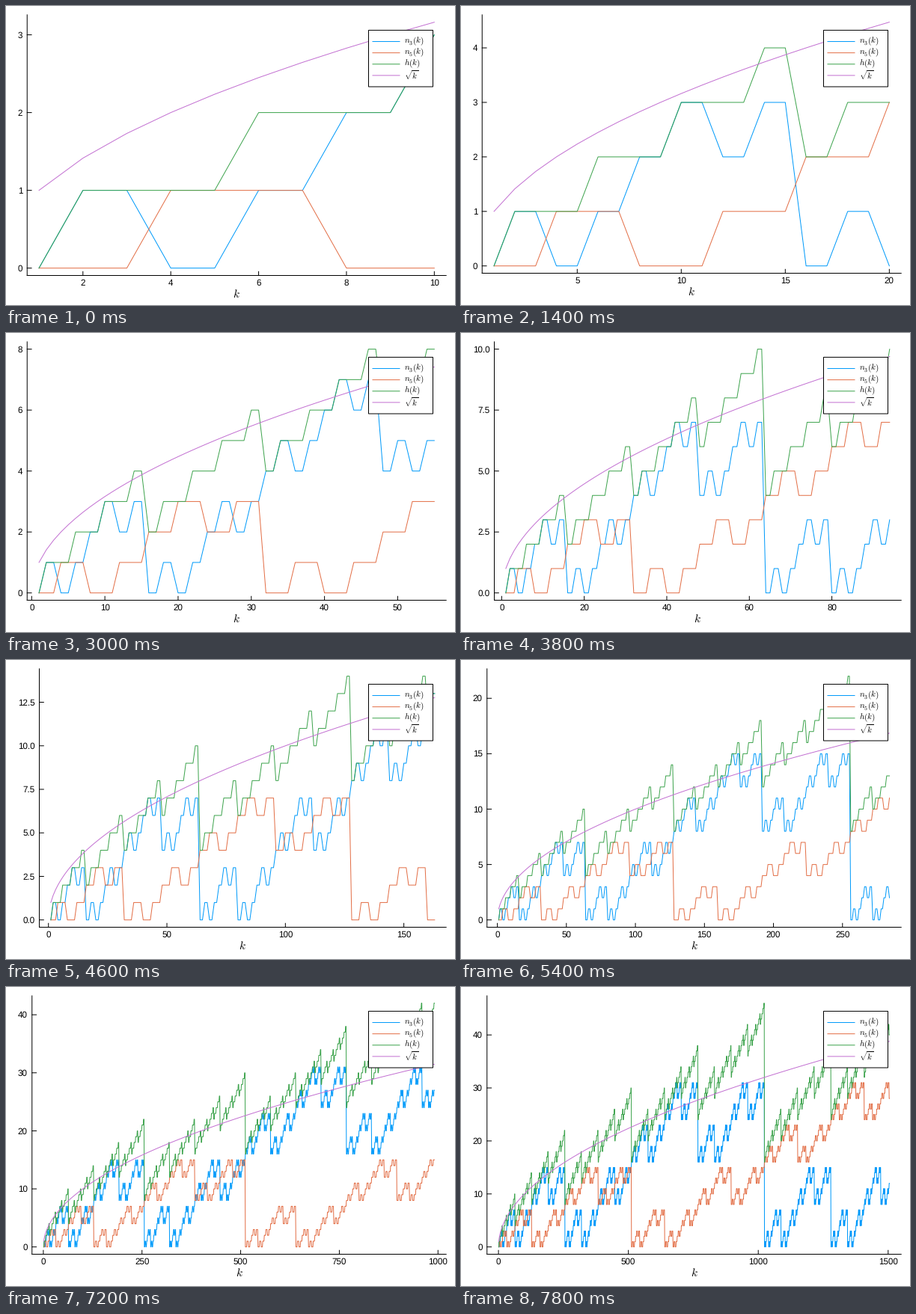
These frames come from a looping animation (600 by 400 pixels, 8000 ms). A matplotlib script:

```python
import math

import matplotlib.pyplot as plt
import numpy as np
from matplotlib.animation import FuncAnimation
from matplotlib.patches import Rectangle

W, H, DPI = 600, 400, 100
FRAMES, INTERVAL = 40, 200
PX = 72 / DPI  # one pixel in points
MARGIN = 11.81  # 3 mm
TOP, RIGHT = MARGIN, W - MARGIN
LEGEND_TOP, ROW = 32.4, 15.12
COLORS = ["#009afa", "#e36f47", "#3ea44e", "#c371d2"]
LABELS = ["$n_3(k)$", "$n_5(k)$", "$h(k)$", r"$\sqrt{k}$"]
NICE = [(1, 1.0), (5, 0.9), (2, 0.7), (2.5, 0.5), (3, 0.2)]
TICK_SIZE = 8.4

plt.rcParams["font.family"] = "Liberation Sans"
plt.rcParams["mathtext.fontset"] = "cm"
plt.rcParams["path.simplify"] = False
plt.rcParams["path.snap"] = False
plt.rcParams["text.hinting"] = "none"

fig = plt.figure(figsize=(W / DPI, H / DPI), dpi=DPI, facecolor="white")
ax = fig.add_axes([0, 0, 1, 1])

# Each frame shows about 15 % more terms than the one before.
sizes = [10]
while len(sizes) < FRAMES:
    sizes.append(sizes[-1] * 115 // 100)


def every_other_bit(k, first):
    """Read bits first, first + 2, ... of k as a binary number."""
    return sum(((k >> (first + 2 * i)) & 1) << i for i in range(6))


k_all = np.arange(1, sizes[-1] + 1)
n3 = every_other_bit(k_all, 1)
n5 = every_other_bit(k_all, 2)
series = [n3, n5, n3 + n5, np.sqrt(k_all)]


def widen(lo, hi):
    pad = 0.03 * (hi - lo)
    return lo - pad, hi + pad


def nice_ticks(lo, hi):
    """Choose tick values by count, coverage and roundness of the step."""
    options = []
    for z in range(4, -3, -1):
        for q, niceness in NICE:
            step = q * 10.0 ** z
            first, last = math.ceil(lo / step), math.floor(hi / step)
            n = last - first + 1
            if 4 <= n <= 8:
                score = (0.25 * (1 - abs(n - 5) / 5) + 0.25 * niceness
                         + 0.5 * (hi - lo) / ((n - 1) * step))
                reach = math.ceil(hi / step) - math.floor(lo / step)
                options.append((round(score, 9), z, -reach, step, first, last))
    *_, step, first, last = max(options)
    values = np.arange(first, last + 1) * step
    digits = 0 if step == int(step) else 1
    return values, [f"{v:.{digits}f}" for v in values]


def line(x, y, color="black", z=2):
    ax.plot(x, y, color=color, lw=PX, zorder=z)


def text(x, y, s, size, ha="center", z=2):
    ax.text(x, y, s, size=size, ha=ha, va="baseline", color="black", zorder=z)


def draw_legend():
    ax.add_patch(Rectangle((484.5, LEGEND_TOP), 86, 5 * ROW, fc="white",
                           ec="black", lw=PX, zorder=5))
    for i, (label, color) in enumerate(zip(LABELS, COLORS)):
        y = LEGEND_TOP + ROW * (i + 1)
        line([490, 526], [y, y], color, z=6)
        drop = 5.2 if "sqrt" in label else 2.9
        text(532, y + drop, label, 8, "left", z=6)


def draw(frame):
    ax.clear()
    ax.set_axis_off()
    ax.set_xlim(0, W)
    ax.set_ylim(H, 0)

    n = sizes[frame]
    x0, x1 = widen(1, n)
    y0, y1 = widen(0, max(s[:n].max() for s in series))
    xt, xlabels = nice_ticks(x0, x1)
    yt, ylabels = nice_ticks(y0, y1)

    # The left margin follows the widest y label.
    left = 21.75 + max(3.25 * s.count(".") + 6.5 * len(s.replace(".", ""))
                       for s in ylabels)
    bottom = 360.5 if frame == 0 else 357.5

    def px(x):
        return left + (x - x0) / (x1 - x0) * (RIGHT - left)

    def py(y):
        return bottom - (y - y0) / (y1 - y0) * (bottom - TOP)

    line([left, left], [TOP, bottom])
    line([left, RIGHT], [bottom, bottom])
    for v, s in zip(xt, xlabels):
        line([px(v)] * 2, [bottom, bottom - 5.2])
        text(px(v), bottom + 13.3, s, TICK_SIZE)
    for v, s in zip(yt, ylabels):
        line([left, left + 5.8], [py(v)] * 2)
        text(left - 6, py(v) + 4, s, TICK_SIZE, "right")
    text((left + RIGHT) / 2, bottom + 29.3, "$k$", 11)

    for s, color in zip(series, COLORS):
        line(px(k_all[:n]), py(s[:n]), color, z=3)
    draw_legend()
    return []


anim = FuncAnimation(fig, draw, frames=FRAMES, interval=INTERVAL,
                     init_func=lambda: draw(0), repeat=True, repeat_delay=0)
plt.show()
```
